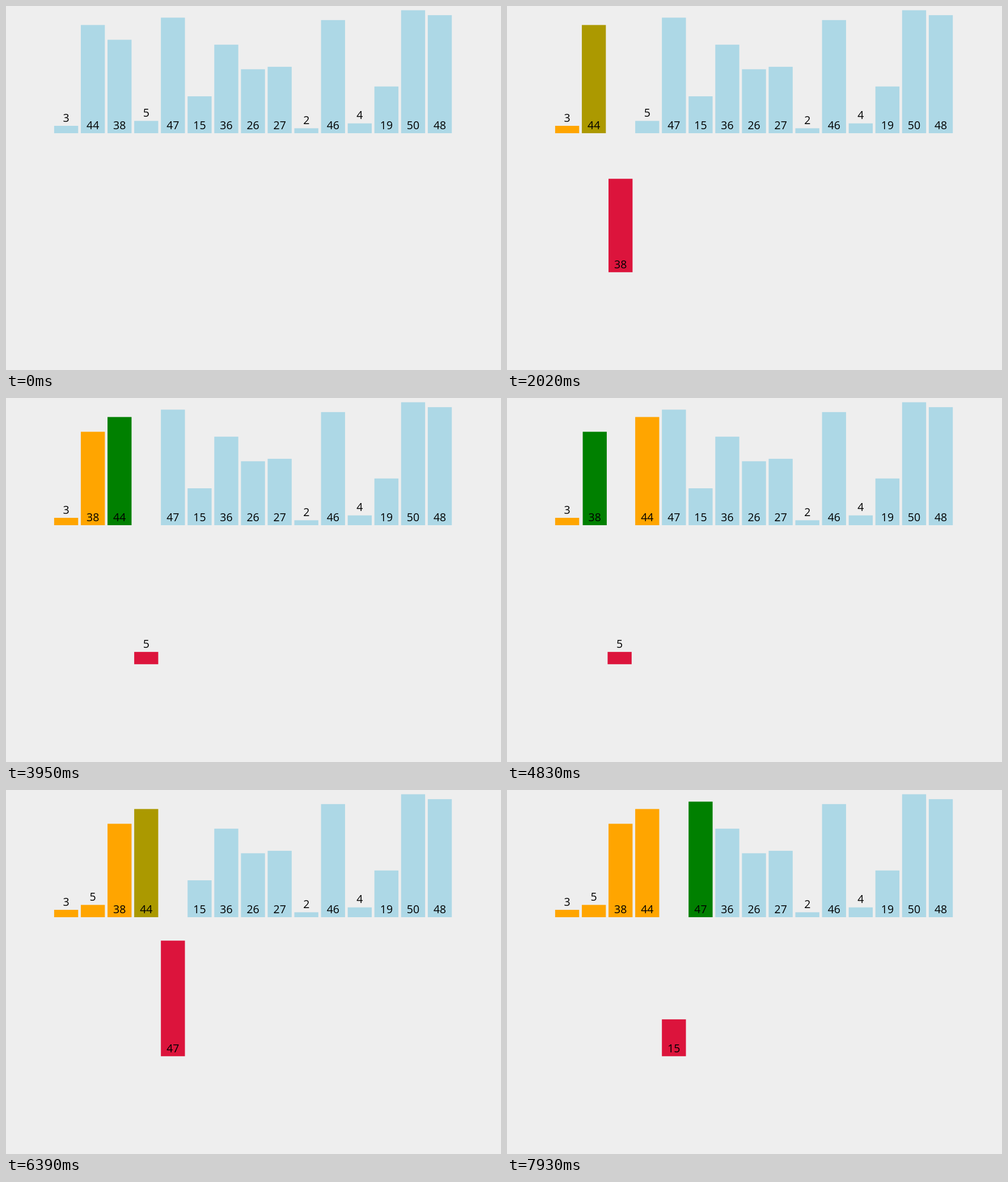
These frames come from a looping animation (873x641 px, 8000 ms). An HTML page with a canvas:

```html
<!DOCTYPE html>
<html lang="en">
<head>
<meta charset="utf-8">
<title>Insertion sort</title>
<style>
  html, body { margin: 0; width: 100%; height: 100%; overflow: hidden; background: #eee; }
  canvas { display: block; }
</style>
</head>
<body>
<canvas id="stage" width="873" height="641"></canvas>
<script>
const ctx = document.getElementById('stage').getContext('2d');

const LOOP = 8000;
const LEFT = 84.9, PITCH = 47.07, WIDTH = 42.37;
const BASE = 224, UNIT = 4.33, DROP = 244.8, LABEL_GAP = 7.3;
const DURATION = 246;

const BLUE = [173, 216, 230], ORANGE = [255, 165, 0];
const GREEN = [0, 128, 0], RED = [220, 20, 60];
const VALUES = [3, 44, 38, 5, 47, 15, 36, 26, 27, 2, 46, 4, 19, 50, 48];

// Each change moves one bar, found by its value, towards new properties.
const tint = (value, color) => ({ value, color });
const lift = value => ({ value, drop: 0, color: ORANGE });
const lower = value => ({ value, drop: 1, color: RED });
const swap = (high, low, slot) => [{ value: high, slot: slot + 1 }, { value: low, slot }];

// First redraw, last redraw, number of redraws, changes.
const STEPS = [
  [150, 280, 3, [tint(3, ORANGE)]],
  [510, 670, 3, [lower(44)]],
  [900, 1040, 3, [tint(3, GREEN)]],
  [1200, 1420, 4, [tint(3, ORANGE), lift(44)]],
  [1570, 1790, 4, [lower(38)]],
  [2020, 2090, 2, [tint(44, GREEN)]],
  [2310, 2540, 4, swap(44, 38, 1)],
  [2770, 2850, 2, [tint(44, ORANGE), tint(3, GREEN)]],
  [3070, 3290, 4, [tint(3, ORANGE), lift(38)]],
  [3440, 3650, 4, [lower(5)]],
  [3810, 3950, 3, [tint(44, GREEN)]],
  [4090, 4330, 4, swap(44, 5, 2)],
  [4560, 4610, 2, [tint(44, ORANGE), tint(38, GREEN)]],
  [4830, 5080, 4, swap(38, 5, 1)],
  [5270, 5360, 2, [tint(38, ORANGE), tint(3, GREEN)]],
  [5570, 5790, 4, [tint(3, ORANGE), lift(5)]],
  [5950, 6090, 3, [lower(47)]],
  [6320, 6470, 3, [tint(44, GREEN)]],
  [6600, 6820, 4, [tint(44, ORANGE), lift(47)]],
  [6960, 7180, 4, [lower(15)]],
  [7420, 7480, 2, [tint(47, GREEN)]],
  [7710, 7930, 4, swap(47, 15, 4)]
];

const mix = (a, b, p) => a + (b - a) * p;

function ease(t) {
  t = Math.min(1, Math.max(0, t));
  return t < 0.5 ? 4 * t ** 3 : 1 - 4 * (1 - t) ** 3;
}

// The two opening steps run slightly ahead of the steady beat.
const startOf = k => k < 2 ? 80 + 360 * k : 122 + 358.3 * k;

// Motion is redrawn at a low frame rate, so time is held between redraws.
function progress(time, k) {
  const [first, last, count] = STEPS[k];
  if (time < first) return 0;
  if (time >= last) return 1;
  const gap = (last - first) / (count - 1);
  const held = first + Math.floor((time - first) / gap) * gap;
  return ease((held - startOf(k)) / DURATION);
}

function barsAt(time) {
  const bars = VALUES.map((value, slot) => ({ value, slot, drop: 0, color: BLUE }));
  STEPS.forEach(([, , , changes], k) => {
    const p = progress(time, k);
    if (!p) return;
    for (const { value, slot, drop, color } of changes) {
      const bar = bars.find(b => b.value === value);
      if (slot !== undefined) bar.slot = mix(bar.slot, slot, p);
      if (drop !== undefined) bar.drop = mix(bar.drop, drop, p);
      if (color) bar.color = bar.color.map((c, i) => mix(c, color[i], p));
    }
  });
  return bars;
}

function drawBar({ value, slot, drop, color }) {
  const x = LEFT + slot * PITCH;
  const bottom = BASE + drop * DROP;
  const top = bottom - value * UNIT;
  ctx.fillStyle = `rgb(${color.map(Math.round)})`;
  ctx.fillRect(x, top, WIDTH, bottom - top);
  ctx.fillStyle = '#000';
  ctx.fillText(value, x + WIDTH / 2, (value > 10 ? bottom : top) - LABEL_GAP);
}

function draw(time) {
  ctx.fillStyle = '#eee';
  ctx.fillRect(0, 0, 873, 641);
  ctx.font = '19.5px "Open Sans", "Noto Sans", sans-serif';
  ctx.textAlign = 'center';
  barsAt(time).forEach(drawBar);
}

const began = performance.now();
function tick() {
  draw((performance.now() - began) % LOOP);
  requestAnimationFrame(tick);
}
tick();
</script>
</body>
</html>
```
